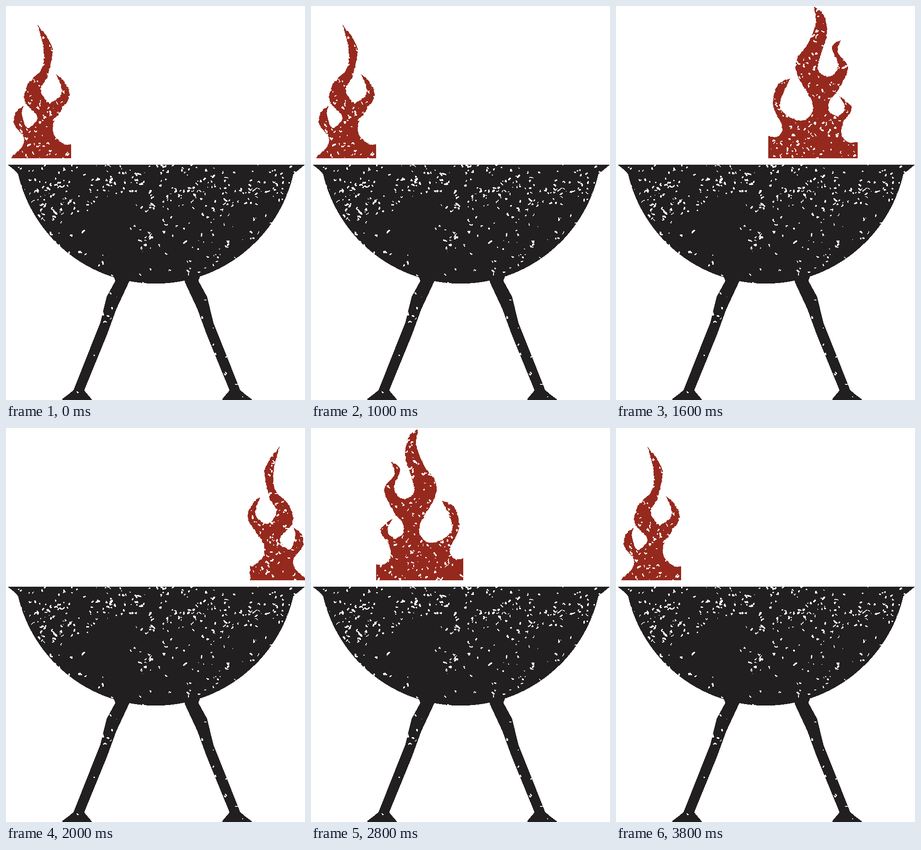
An HTML page for the animation above (4 s loop, 652x859 px).

```html
<!DOCTYPE html>
<html lang="en">
<head>
<meta charset="utf-8">
<title>Grill</title>
<style>
  html, body { margin: 0; width: 100%; height: 100%; overflow: hidden; background: #fff; }
  svg { display: block; }
  path { shape-rendering: crispEdges; }
  .iron { fill: #221f20; }
  .fire { fill: #96291e; filter: url(#rough); }
  .chips { fill: none; stroke: #fff; stroke-linecap: round; stroke-linejoin: round; }
  .flame { opacity: 0; }
</style>
</head>
<body>
<svg id="stage" width="652" height="859" viewBox="0 0 652 859">
  <defs>
    <filter id="rough" filterUnits="userSpaceOnUse" x="0" y="0" width="652" height="859" color-interpolation-filters="sRGB">
      <feTurbulence type="fractalNoise" baseFrequency=".15" numOctaves="2" seed="4"/>
      <feDisplacementMap in="SourceGraphic" scale="4" xChannelSelector="R" yChannelSelector="G"/>
    </filter>
    <clipPath id="belowRim"><rect y="346" width="652" height="513"/></clipPath>
  </defs>
  <g id="grill" clip-path="url(#belowRim)">
    <g class="iron" transform="translate(.5 1)">
      <path d="M4 340H650V346L626 366A308 308 0 0 1 26 366Q20 357 4 346Z"/>
      <path id="leg" d="M234 588L238 598 219 633 205 690 183 745 147 836 138 844 122 856V862H186V856L170 837 220 715 240 660 268 600V588Z"/>
      <use href="#leg" transform="matrix(-1 0 0 1 657 0)"/>
    </g>
  </g>
</svg>
<script>
const stage = document.getElementById('stage');
const defs = stage.querySelector('defs');

function add(parent, tag, attrs) {
  const node = document.createElementNS('http://www.w3.org/2000/svg', tag);
  for (const key in attrs) node.setAttribute(key, attrs[key]);
  return parent.appendChild(node);
}

function seeded(s) {
  return () => {
    s = (s + 0x6D2B79F5) | 0;
    let t = Math.imul(s ^ (s >>> 15), 1 | s);
    t = (t + Math.imul(t ^ (t >>> 7), 61 | t)) ^ t;
    return ((t ^ (t >>> 14)) >>> 0) / 4294967296;
  };
}

// Smooth curves through key points; "|" marks a sharp corner.
function outline(text) {
  let last, d = '';
  for (const arc of text.split('|')) {
    const p = arc.trim().split(/\s+/).map(s => s.split(',').map(Number));
    if (last) p.unshift(last);
    else d = 'M' + p[0];
    for (let i = 0; i < p.length - 1; i++) {
      const [p0, p1, p2, p3] = [p[i - 1] || p[i], p[i], p[i + 1], p[i + 2] || p[i + 1]];
      const c1 = p1.map((v, k) => v + (p2[k] - p0[k]) / 6);
      const c2 = p2.map((v, k) => v - (p3[k] - p1[k]) / 6);
      d += `C${c1} ${c2} ${p2}`;
    }
    last = p[p.length - 1];
  }
  return d + 'Z';
}

// Worn ink: short random walks, as dense as wear(x, y) says.
function chips(parent, seed, [left, top, right, bottom], wear) {
  const rand = seeded(seed);
  const tries = (right - left) * (bottom - top) * .008;
  const step = () => ((rand() - .5) * 6).toFixed(1);
  for (const width of [1.6, 2.4, 3.4]) {
    let d = '';
    for (let i = 0; i < tries / 3; i++) {
      const x = left + rand() * (right - left), y = top + rand() * (bottom - top);
      if (rand() > wear(x, y)) continue;
      d += `M${x.toFixed(1)} ${y.toFixed(1)}l.1 0`;
      for (let n = Math.floor(rand() * 4); n > 0; n--) d += `l${step()} ${step()}`;
    }
    add(parent, 'path', { class: 'chips', d, 'stroke-width': width });
  }
}

const sideFlame = base => outline(`68,40 92,72 101,100 90,152 75,183 94,209 118,195 120,175 108,148
  | 123,160 138,197 106,248 104,280 126,300 ${base},300 | ${base},336 | 11,336
  | 11,329 34,308 38,285 18,258 20,232 38,218 | 34,235 46,265 66,250 65,236 42,210 40,190 50,165
  78,135 81,90 68,40`);

const middleFlame = outline(`233,2 229,35 245,80 270,115 270,150 236,212 245,243 268,250 302,230
  306,205 285,158 | 312,172 323,215 303,262 312,284 336,284 | 336,336 | 136,336
  | 136,299 158,298 173,280 170,255 151,222 178,196 | 166,222 180,240 200,230 200,208 184,190
  | 159,135 182,100 174,73 | 194,90 180,130 200,154 224,140 218,105 205,60 212,20 233,2`);

function flame(id, d, left, right, mirrored, seed) {
  const clip = add(defs, 'clipPath', { id: 'clip-' + id });
  add(clip, 'rect', { x: left, width: right - left, height: 332 });
  const g = add(stage, 'g', { id, class: 'flame', 'clip-path': `url(#clip-${id})` });
  const side = add(g, 'g', { transform: mirrored ? 'matrix(-1 0 0 1 665 0)' : 'translate(.5 .5)' });
  add(side, 'path', { class: 'fire', d });
  chips(g, seed, [left, 0, right, 332], (x, y) => .5 + .2 * Math.min(1, y / 250));
}

flame('a', sideFlame(146), 11, 142, false, 11);
flame('b', middleFlame, 142, 332, false, 22);
flame('c', middleFlame, 332, 527, true, 33);
flame('d', sideFlame(133), 526, 652, true, 44);

function grillWear(x, y) {
  const near = (cx, cy, r) => Math.exp(-((x - cx) ** 2 + (y - cy) ** 2) / r ** 2);
  const upperBand = Math.exp(-(((y - 390) / 50) ** 2));
  return .13 + .6 * upperBand
    + .5 * near(100, 445, 50) + .9 * near(300, 508, 24) + .35 * near(485, 515, 55)
    + .4 * near(226, 655, 32) - .3 * near(230, 465, 70);
}
chips(document.getElementById('grill'), 7, [0, 346, 652, 859], grillWear);

// Which flame burns in each equal step of the loop.
const order = [...'abcddacbcbdadcbadcba'];
const sheet = document.querySelector('style');
for (const id of 'abcd') {
  const frames = order.map((on, i) => `${i * 100 / order.length}% { opacity: ${+(on === id)}; }`);
  sheet.append(`@keyframes ${id} { ${frames.join(' ')} } #${id} { animation: ${id} 4s step-end infinite; }`);
}
</script>
</body>
</html>
```
